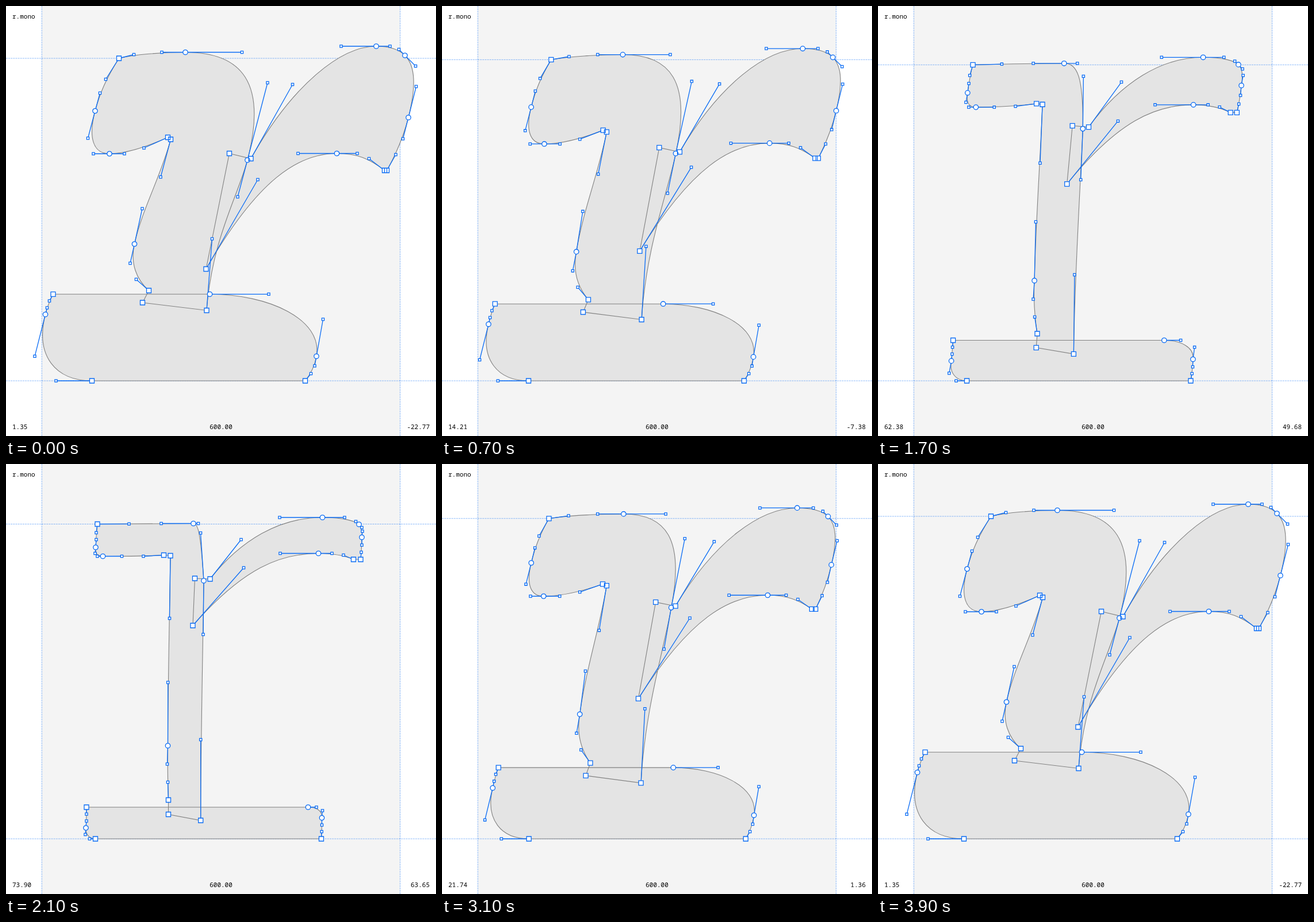
An HTML page for the animation above (4000 ms loop, 748 by 748 pixels).

```html
<!DOCTYPE html>
<html lang="en">
<head>
<meta charset="utf-8">
<title>r.mono</title>
<style>
html, body { margin: 0; width: 100%; height: 100%; overflow: hidden; background: #fff; }
svg { display: block; width: 748px; height: 748px; }
text { font: 500 11px "Noto Sans Mono", "DejaVu Sans Mono", monospace; fill: #000; white-space: pre; }
.guide { fill: none; stroke: #0a6cf5; stroke-width: 1; stroke-dasharray: 1 2; }
.glyph { fill: #e4e4e4; stroke: #808080; stroke-width: 1.1; }
.arms { fill: none; stroke: #0a6cf5; stroke-width: 1.3; }
.node { fill: #fff; stroke: #0a6cf5; stroke-width: 1.3; }
</style>
</head>
<body>
<svg viewBox="0 0 748 748">
  <rect x="62" width="623.5" height="748" fill="#f4f4f4"/>
  <path class="guide" id="guides"/>
  <path class="glyph" id="glyph"/>
  <path class="arms" id="arms"/>
  <path class="node" id="small"/>
  <path class="node" id="large"/>
  <text x="11" y="21.5">r.mono</text>
  <text x="11" y="736" id="left"></text>
  <text x="374" y="736" text-anchor="middle">600.00</text>
  <text x="737" y="736" text-anchor="end" id="right"></text>
</svg>
<script>
const el = id => document.getElementById(id);

// Per point: kind (S corner, O smooth, h handle), then heavy x y and light x y.
const stem = `S 196.5 91 159 104.5|h 222.5 84.5 214 104.3|h 271 80.5 270 103.5|O 312 80.5 326 103.5
|h 410.5 80.5 334.5 103.5|h 455 133.5 338.5 120|O 420 268 344 203|h 403 332 343 296.5
|h 358.5 405 338.7 479.5|S 349 529.5 338.7 620|S 237.5 516 282.5 609.5|S 248.5 495 282.5 584.5
|h 226.5 475.5 281.5 553.5|h 216 447.5 280.5 522|O 223.5 414 281.5 490|h 237 352.5 281.7 380
|h 269 297.5 284.5 268.5|S 286.5 232 286 159.5|S 281.5 228.5 274.5 158.5|h 240 247 239 160.5
|h 206 257 201.5 160.5|O 180 257 168.5 160.5|h 152 257 159 160.5|h 142.5 230 155 155.5
|O 155 182.5 156 145|h 163.5 151.5 157 131.5|h 173.5 127.5 157 119.5`;
const arm = `S 388.5 256.5 328.5 199|S 426 265.5 355 200|h 498.5 136.5 409 131.5|h 583 70 476 93
|O 644 70 550.5 93|h 668 70 589 93|h 683.5 75.5 608.5 100|O 694 86 614 105
|h 712.5 104.5 619 110.5|h 713.5 140 620 117|O 700 194 619 127.5|h 690.5 231 619 141
|h 678 258.5 618 153.5|S 662.5 286 617 166|S 658.5 286 604.5 166|h 631.5 265.5 587 158.5
|h 611 256.5 567 155.5|O 575.5 256.5 543.5 155.5|h 508 256.5 477 155.5|h 438 302 413.5 180.5
|S 348 457.5 325 281`;
const foot = `S 82 501.3 140 597|O 354.5 501.3 525.5 597|h 457 501.3 540 597|h 551.5 545 550.5 603
|O 540 609.3 549.5 615.5|h 537 626 549.5 628|h 530.5 639.5 549.2 639.5|S 520.5 652 548.5 652
|S 149.5 652 155.5 652|h 87 652 145.5 652|h 50 609.3 138 644.5|O 68.5 536.5 139 633
|h 71.5 525 140 621|h 75.5 513 140 609`;

const contours = [stem, arm, foot].map(s => s.split("|").map(p => {
  const [kind, ...n] = p.trim().split(" ");
  return { kind, n: n.map(Number) };
}));

// Rises from 0 at 100 ms to the lightest weight at 2000 ms.
function lightness(ms) {
  const x = Math.max(0, (ms - 100) / 1800);
  return x * x + (0.18 + 0.345 * x) * (x - x * x);
}

// Side bearings at a few moments, interpolated along the weight.
const knots = [100, 700, 900, 1300, 1900, 2000].map(lightness);
const lsb = [1.35, 14.21, 21.74, 40.84, 73.90, 79.6];
const rsb = [-22.77, -7.38, 1.36, 23.56, 63.65, 70.5];
function bearing(list, u) {
  let i = 0;
  while (i < knots.length - 2 && u > knots[i + 1]) i++;
  const k = (u - knots[i]) / (knots[i + 1] - knots[i]);
  return (list[i] + (list[i + 1] - list[i]) * k).toFixed(2);
}

const at = p => p.x.toFixed(2) + " " + p.y.toFixed(2);
const square = (p, r) =>
  `M${(p.x - r).toFixed(2)} ${(p.y - r).toFixed(2)}h${2 * r}v${2 * r}h${-2 * r}z`;
const circle = (p, r) =>
  `M${(p.x - r).toFixed(2)} ${p.y.toFixed(2)}a${r} ${r} 0 1 0 ${2 * r} 0a${r} ${r} 0 1 0 ${-2 * r} 0z`;

function draw(u) {
  let glyph = "", arms = "", small = "", large = "";
  const shapes = contours.map(c => c.map(({ kind, n }) => ({
    kind,
    x: n[0] + (n[2] - n[0]) * u,
    y: n[1] + (n[3] - n[1]) * u
  })));
  for (const pts of shapes) {
    const get = i => pts[i % pts.length];
    glyph += "M" + at(pts[0]);
    for (let i = 0; i < pts.length;) {
      const a = get(i), b = get(i + 1);
      large += a.kind === "S" ? square(a, 4) : circle(a, 4.2);
      if (b.kind !== "h") {
        glyph += "L" + at(b);
        i++;
        continue;
      }
      const c = get(i + 2), d = get(i + 3);
      glyph += `C${at(b)} ${at(c)} ${at(d)}`;
      arms += `M${at(a)}L${at(b)}M${at(c)}L${at(d)}`;
      small += square(b, 2.1) + square(c, 2.1);
      i += 3;
    }
    glyph += "Z";
  }
  const top = shapes[0][0].y.toFixed(2);
  el("guides").setAttribute("d", `M62.3 0V748M685.6 0V748M0 ${top}H748M0 652H748`);
  el("glyph").setAttribute("d", glyph);
  el("arms").setAttribute("d", arms);
  el("small").setAttribute("d", small);
  el("large").setAttribute("d", large);
  el("left").textContent = bearing(lsb, u);
  el("right").textContent = bearing(rsb, u);
}

const loop = 4000, step = 100;
const start = performance.now();
function tick() {
  const t = Math.floor(((performance.now() - start) % loop) / step) * step;
  draw(lightness(Math.min(t, loop - t)));
  requestAnimationFrame(tick);
}
tick();
</script>
</body>
</html>
```
